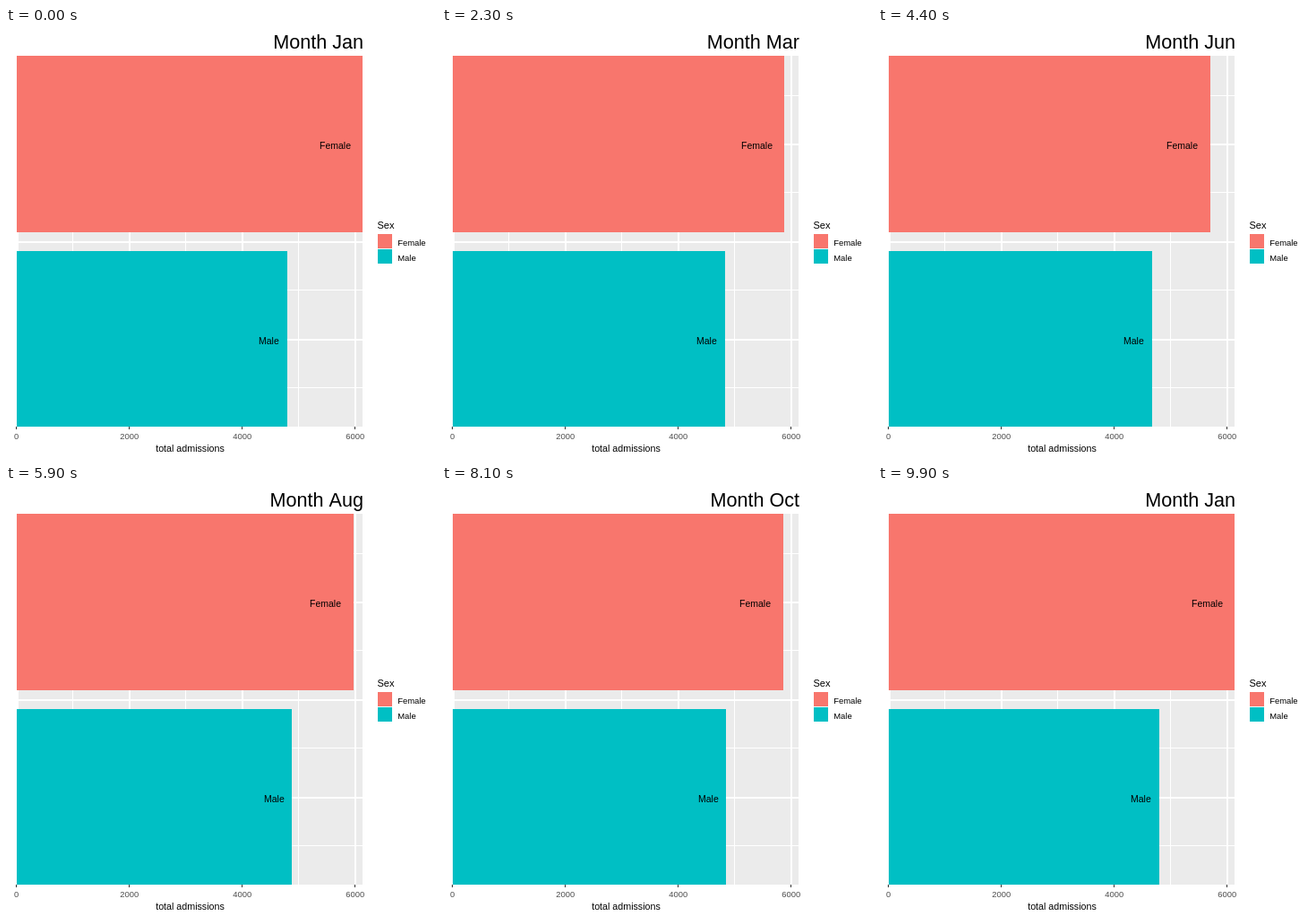
These frames come from a looping animation (480 by 480 pixels, 10 s). An HTML page with a canvas:

```html
<!DOCTYPE html>
<html lang="en">
<head>
<meta charset="utf-8">
<title>Monthly admissions by sex</title>
<style>
  html, body { margin: 0; width: 100%; height: 100%; overflow: hidden; background: #fff; }
  canvas { display: block; }
</style>
</head>
<body>
<canvas id="stage" width="480" height="480"></canvas>
<script>
const ctx = document.getElementById('stage').getContext('2d');
const LOOP = 10000, TICK = 100;
const PINK = '#F8766D', TEAL = '#00BFC4';
const LEFT = 12, RIGHT = 398, TOP = 31, BOTTOM = 445;

// Per month: name, right edges of both bars in px, start of the move to the next month, its steps
const months = [
  ['Jan', 398.5, 314.3,  500, 4],
  ['Feb', 358.5, 289.2, 1400, 4],
  ['Mar', 382.2, 315.8, 2300, 4],
  ['Apr', 384.3, 318.0, 3200, 4],
  ['May', 385.2, 319.2, 4100, 4],
  ['Jun', 371.2, 306.2, 4900, 3],
  ['Jul', 379.8, 311.8, 5600, 4],
  ['Aug', 388.3, 319.6, 6400, 4],
  ['Sep', 363.0, 298.0, 7200, 4],
  ['Oct', 389.4, 327.0, 8000, 4],
  ['Nov', 373.2, 308.2, 8800, 4],
  ['Dec', 373.1, 308.85, 9600, 4],
].map(([name, female, male, start, steps]) => ({ name, female, male, start, steps }));

function stateAt(time) {
  const now = Math.floor(time / TICK) * TICK;
  let i = months.findLastIndex(m => now >= m.start);
  if (i < 0) return { title: 'Jan', female: months[0].female, male: months[0].male };
  const from = months[i], to = months[(i + 1) % months.length];
  const p = Math.min(1, ((now - from.start) / TICK + 1) / from.steps);
  const mix = key => from[key] + (to[key] - from[key]) * p;
  return { title: (p > 0.5 ? to : from).name, female: mix('female'), male: mix('male') };
}

function rect(x, y, w, h, color) {
  ctx.fillStyle = color;
  ctx.fillRect(x, y, w, h);
}

function text(str, x, y, size, align = 'left', color = '#000') {
  ctx.font = `${size}px "Liberation Sans", Arial, sans-serif`;
  ctx.textAlign = align;
  ctx.fillStyle = color;
  ctx.fillText(str, x, y);
}

function bar(label, edge, y, h, color, labelOffset) {
  rect(LEFT, y, Math.floor(edge) - LEFT, h, color);
  text(label, Math.floor(edge - labelOffset) - 1, y + 104, 10.5);
}

function drawPanel() {
  rect(LEFT, TOP, RIGHT - LEFT, BOTTOM - TOP, '#EBEBEB');
  for (let i = 0; i < 7; i++) {
    const wide = i % 2 ? 2 : 1;
    rect(LEFT, Math.round(74.5 + i * 54.4), RIGHT - LEFT, wide, '#fff');
    rect(Math.round(11.5 + i * 62.95), TOP, 3 - wide, BOTTOM - TOP, '#fff');
  }
}

function drawAxis() {
  for (let i = 0; i < 4; i++) {
    const x = Math.round(11.5 + i * 125.9);
    rect(x - (i ? 0 : 1), BOTTOM, 1, 3, '#333');
    text(i * 2000, x + (i ? 0.7 : -0.3), 459, 9.4, 'center', '#4D4D4D');
  }
  text('total admissions', 205.5, 473, 10.7, 'center');
}

function drawLegend() {
  text('Sex', 414.5, 224, 11);
  rect(415, 230, 16, 16, PINK);
  rect(415, 247, 16, 16, TEAL);
  text('Female', 437.3, 243, 9.4);
  text('Male', 437.3, 260, 9.4);
}

function draw(time) {
  const { title, female, male } = stateAt(time % LOOP);
  rect(0, 0, 480, 480, '#fff');
  drawPanel();
  bar('Female', female, 31, 197, PINK, 47.5);
  bar('Male', male, 249, 196, TEAL, 30.5);
  drawAxis();
  drawLegend();
  text('Month ' + title, 399, 23, 21.6, 'right');
}

function frame() {
  draw(performance.now());
  requestAnimationFrame(frame);
}
frame();
</script>
</body>
</html>
```
